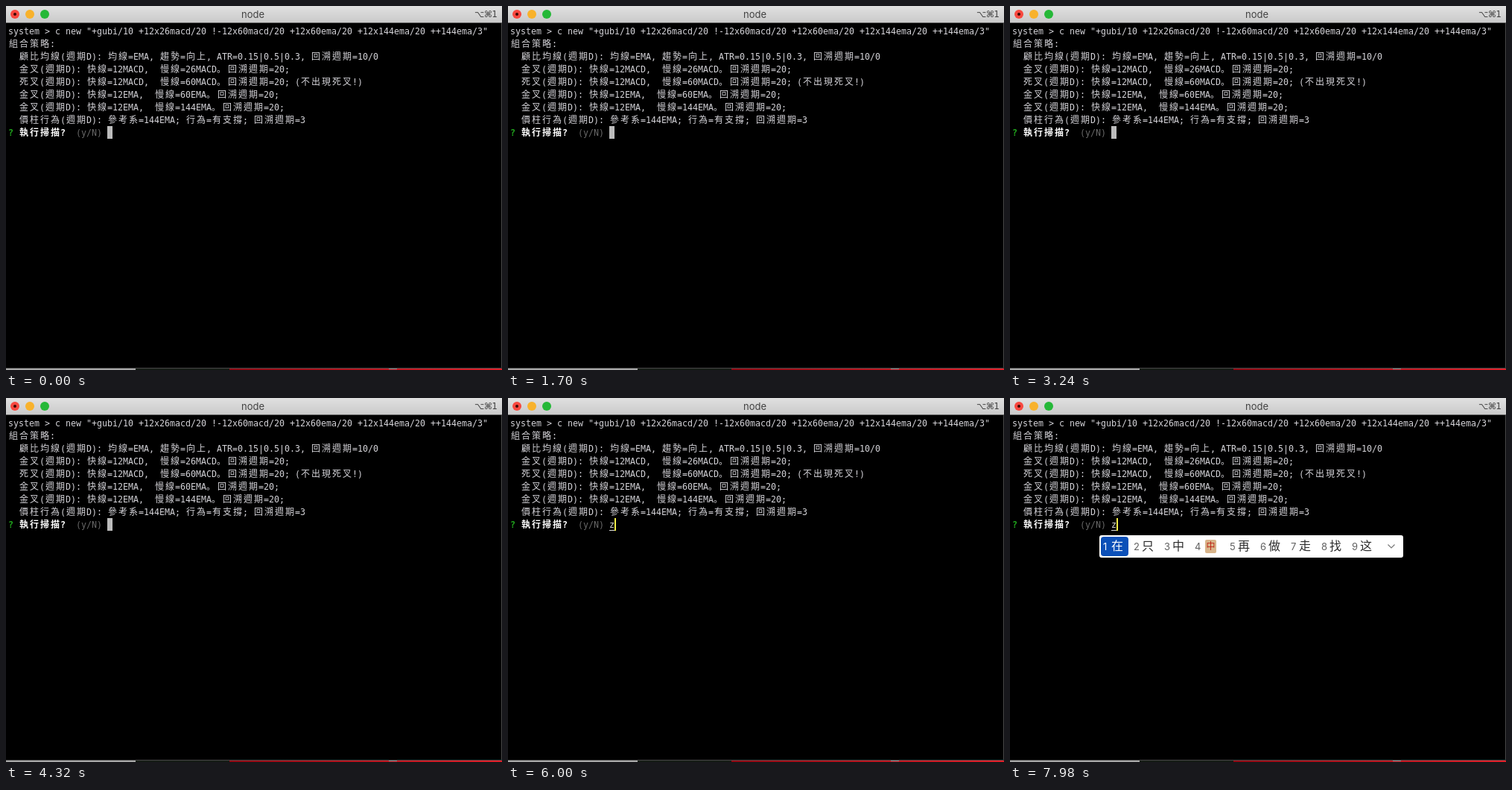
These frames come from a looping animation (666x488 px, 8 s). An HTML page:

```html
<!DOCTYPE html>
<html lang="zh-Hant">
<head>
<meta charset="utf-8">
<title>node</title>
<style>
html, body { margin: 0; width: 100%; height: 100%; overflow: hidden; background: #000; }
svg { display: block; width: 666px; height: 488px; }
text { white-space: pre; }
.mono { font: 11.63px "DejaVu Sans Mono", monospace; }
.wide { font: 500 12px "Noto Sans CJK TC", "Noto Sans CJK", sans-serif; letter-spacing: 2px; }
.stop { font: 500 12px "Noto Sans CJK SC", "Noto Sans CJK", sans-serif; }
.bold { font-weight: 700; }
.pick { font: 16px "Noto Sans CJK SC", "Noto Sans CJK", sans-serif; }
.num { font: 13px Inter, sans-serif; }
#typed, #popup { opacity: 0; }
</style>
</head>
<body>
<svg id="stage" viewBox="0 0 666 488">
  <defs>
    <linearGradient id="bar" x2="0" y2="1">
      <stop stop-color="#e0e0e0"/><stop offset="1" stop-color="#cacaca"/>
    </linearGradient>
    <linearGradient id="red">
      <stop stop-color="#8e0a14"/><stop offset="1" stop-color="#e0202a"/>
    </linearGradient>
  </defs>
  <rect width="666" height="488"/>
  <path d="M665.5 22V485.5H0" fill="none" stroke="#484848"/>
  <rect width="666" height="22" fill="url(#bar)"/>
  <path d="M0 22.5H666" stroke="#6c6c6c"/>
  <circle cx="12" cy="11" r="6" fill="#f8483f"/>
  <circle cx="12" cy="11" r="2" fill="#3a0804"/>
  <circle cx="32" cy="11" r="6" fill="#f8b22c"/>
  <circle cx="52" cy="11" r="6" fill="#25b838"/>
  <text x="331.5" y="16" text-anchor="middle" fill="#424242" style="font:13px Inter,sans-serif">node</text>
  <text x="659" y="15" text-anchor="end" fill="#424242" style="font:11.5px 'DejaVu Sans',sans-serif;letter-spacing:-.8px">⌥⌘1</text>

  <rect y="486" width="174" height="2" fill="#a8a8a8"/>
  <rect x="174" y="486" width="126" height="2" fill="#161c16"/>
  <rect x="300" y="486" width="366" height="2" fill="url(#red)"/>
  <rect x="514" y="486" width="11" height="1" fill="#8c8c8c"/>

  <g id="lines"></g>
  <rect id="block" x="136" y="161" width="7" height="17" fill="#bcbcbc"/>
  <g id="typed">
    <text class="mono" x="136" y="174" fill="#d8d8d8">z</text>
    <path d="M136 177.5h7" stroke="#d8d8d8"/>
    <rect x="143" y="161" width="2" height="17" fill="#f4ee48"/>
  </g>
  <g id="popup">
    <rect x="120" y="184" width="408" height="30" rx="3" fill="#fff"/>
    <rect x="122" y="186" width="37" height="26" rx="4" fill="#0b50b8"/>
    <path d="M507.5 196.5l4.5 4.5l4.5-4.5" fill="none" stroke="#777" stroke-width="1.2"/>
  </g>
</svg>
<script>
const CELL = 7, LEFT = 3, LOOP = 8000;
const PALE = "#d4d3d8";
const $ = id => document.getElementById(id);

function add(parent, tag, attrs, content = "") {
  const el = document.createElementNS("http://www.w3.org/2000/svg", tag);
  for (const key in attrs) el.setAttribute(key, attrs[key]);
  el.textContent = content;
  return parent.appendChild(el);
}

// Han characters take two terminal cells, everything else takes one.
function write(row, col, str, fill = PALE, weight = "") {
  for (const run of str.match(/。|[\u4e00-\u9fff]+|[^。\u4e00-\u9fff]+/g)) {
    const han = run.charCodeAt(0) >= 0x4e00, stop = run === "。";
    const kind = stop ? "stop" : han ? "wide" : "mono";
    add($("lines"), "text", {
      x: LEFT + col * CELL + (han ? 1 : 0), y: 38 + row * 17, fill, class: kind + " " + weight
    }, run);
    col += run.length * (han || stop ? 2 : 1);
  }
}

const cross = (name, fast, slow, note = "") =>
  `  ${name}(週期D): 快線=${fast},  慢線=${slow}。回溯週期=20;${note}`;

[
  'system > c new "+gubi/10 +12x26macd/20 !-12x60macd/20 +12x60ema/20 +12x144ema/20 ++144ema/3"',
  "組合策略:",
  "  顧比均線(週期D): 均線=EMA, 趨勢=向上, ATR=0.15|0.5|0.3, 回溯週期=10/0",
  cross("金叉", "12MACD", "26MACD"),
  cross("死叉", "12MACD", "60MACD", " (不出現死叉!)"),
  cross("金叉", "12EMA", "60EMA"),
  cross("金叉", "12EMA", "144EMA"),
  "  價柱行為(週期D): 參考系=144EMA; 行為=有支撐; 回溯週期=3"
].forEach((line, row) => write(row, 0, line));

write(8, 0, "?", "#20a51c", "bold");
write(8, 2, "執行掃描?", "#fff", "bold");
write(8, 13, "(y/N)", "#686868");

[..."在只中🀄再做走找这"].forEach((char, i) => {
  const x = 126 + i * 41 + (i > 3 ? 6 : 0), popup = $("popup");
  const first = i === 0;
  add(popup, "text", { x: x - 1, y: 204, class: "num", fill: first ? "#fff" : "#606060" }, i + 1);
  if (i === 3) {
    add(popup, "rect", { x: x + 13, y: 190, width: 15, height: 18, rx: 2, fill: "#d8b48a" });
    add(popup, "text", { x: x + 14.5, y: 203, class: "pick bold", fill: "#bd2415", style: "font-size:12px" }, "中");
  } else {
    add(popup, "text", { x: x + 10, y: 204, class: "pick" + (first ? " bold" : ""), fill: first ? "#fff" : "#2c2c2c" }, char);
  }
});

// Each part switches once per loop: [id, time, opacity before, opacity after].
[
  ["block", 5960, 1, 0],
  ["typed", 5960, 0, 1],
  ["popup", 6060, 0, 1]
].forEach(([id, at, before, after]) => $(id).animate([
  { opacity: before, offset: 0 },
  { opacity: before, offset: at / LOOP },
  { opacity: after, offset: at / LOOP },
  { opacity: after, offset: 1 }
], { duration: LOOP, iterations: Infinity }));
</script>
</body>
</html>
```
